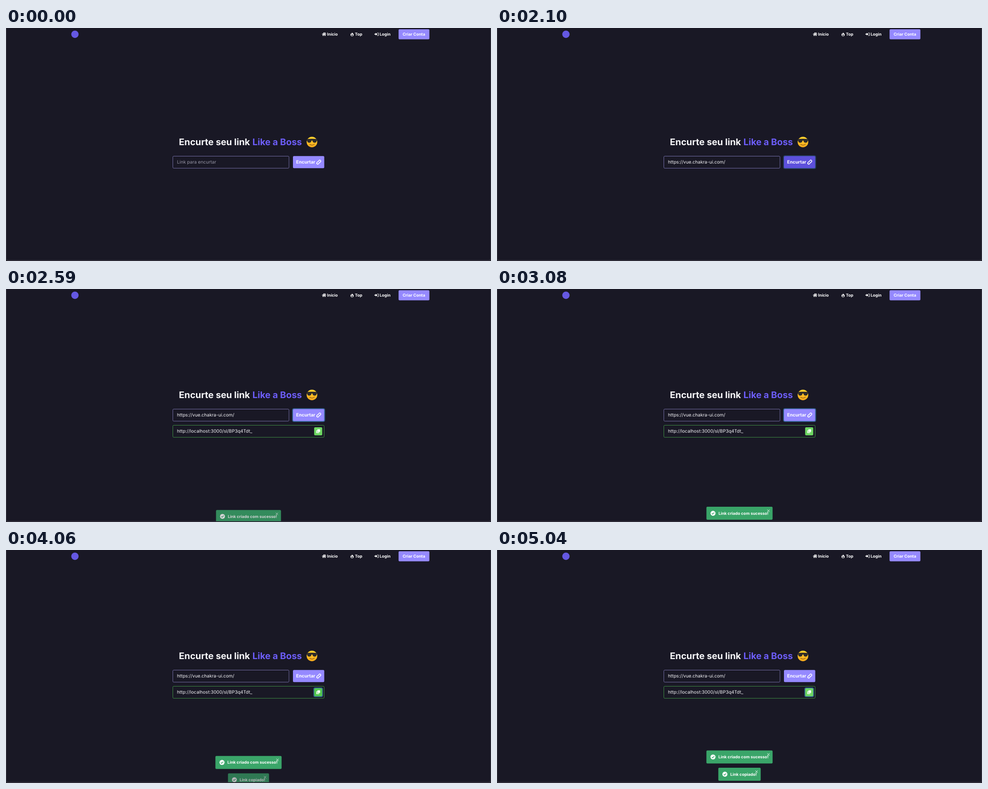
An HTML page that plays this animation: 1080 px wide and 519 px high, repeating every 5.18 s.

```html
<!DOCTYPE html>
<html lang="pt-BR">
<head>
<meta charset="utf-8">
<title>Encurtador de links</title>
<style>
  html, body { margin: 0; width: 100%; height: 100%; overflow: hidden; background: #191825; }
  svg { display: block; width: 100vw; height: 100vh; }
  text { font: 10.125px Inter, sans-serif; fill: #f6f6f9; text-rendering: geometricPrecision; white-space: pre; }
  .small { font-weight: 700; font-size: 9px; fill: #fff; }
  .title { font-weight: 700; font-size: 20.25px; }
  .label { font-weight: 700; fill: #fff; }
  .icon { fill: #fff; }
  .line { fill: none; stroke: #fff; }
  .ring { fill: none; stroke: #4299e1; stroke-opacity: .6; stroke-width: 1.7; }
</style>
</head>
<body>
<svg viewBox="0 0 1080 519">
  <defs>
    <linearGradient id="face" x2="0" y2="1">
      <stop offset="0" stop-color="#ffd42e"/>
      <stop offset="1" stop-color="#f9a91c"/>
    </linearGradient>
    <g id="check">
      <circle r="5.6" fill="#fff"/>
      <path d="M-2.6 .2 L-.8 2 L2.8 -1.7" fill="none" stroke="#3aa569" stroke-width="1.4"/>
    </g>
    <path id="cross" d="M-2.7 -2.7 L2.7 2.7 M2.7 -2.7 L-2.7 2.7" fill="none" stroke="#fff" stroke-width=".9"/>
  </defs>

  <rect width="1080" height="519" fill="#191825"/>

  <!-- navigation -->
  <circle cx="153.5" cy="14" r="8.2" fill="#6558e2"/>
  <g transform="translate(703.5 9.6)">
    <path class="line" d="M.5 4.3 L4.8 .8 L9.1 4.3" stroke-width="1.1" stroke-linecap="round"/>
    <path class="icon" d="M7 .4 H8.2 V3 H7Z M1.6 4.9 L4.8 2.3 L8 4.9 V8 H5.7 V5.7 H3.9 V8 H1.6Z"/>
  </g>
  <text class="small" x="715" y="17.2">Início</text>
  <path class="icon" transform="translate(767.2 9.3)" fill-rule="evenodd"
    d="M3.2 0 C3.4 2 6.9 2.8 6.9 5.6 A3.4 3.4 0 0 1 .1 5.6 C.1 4 1 3 1.7 2.4 C1.8 3.2 2 3.6 2.5 3.9 C3 2.6 3.4 1.6 3.2 0Z
       M3.6 4.3 C3 5.2 1.9 5.8 1.9 6.6 A1.6 1.5 0 0 0 5.2 6.6 C5.2 5.9 4.9 5.5 4.6 5.1 L4 5.7Z"/>
  <text class="small" x="777" y="17.2">Top</text>
  <g transform="translate(820.7 9.8)">
    <path class="icon" d="M0 2.8 H2.8 V.8 L6.4 4 L2.8 7.2 V5.2 H0Z"/>
    <path class="line" d="M6.2 .9 H7.6 Q8.5 .9 8.5 1.9 V6.1 Q8.5 7.1 7.6 7.1 H6.2" stroke-width="1.1"/>
  </g>
  <text class="small" x="832" y="17.2">Login</text>
  <rect x="874.2" y="2.8" width="68.6" height="22.5" rx="2.25" fill="#9589ff"/>
  <text class="small" x="883.2" y="17.2">Criar Conta</text>

  <!-- main form -->
  <g id="form">
    <text class="title" x="385" y="261.3">Encurte seu link</text>
    <text class="title" x="548.7" y="261.3" style="fill:#6c5df8">Like a Boss</text>
    <g transform="translate(681.3 254)">
      <circle r="11.8" fill="url(#face)"/>
      <path d="M-12 -6.6 Q0 -8 12 -6.6 L11.8 -3.6 L10.7 -3 Q10.2 1.6 5.8 1.6 Q1.8 1.6 1 -3.2 H-1 Q-1.8 1.6 -5.8 1.6 Q-10.2 1.6 -10.7 -3 L-11.8 -3.6Z" fill="#2d2b2a"/>
      <path d="M-5 5 Q.6 9.2 5.6 4.4" fill="none" stroke="#8a5a16" stroke-width="1.2" stroke-linecap="round"/>
    </g>
    <rect id="field" x="371.5" y="285.5" width="258.6" height="26.8" rx="2" fill="none"/>
    <text id="value" x="380.8" y="302.4"></text>
    <rect id="caret" y="293" width=".8" height="11.5" fill="#fff"/>
    <rect id="send" x="639" y="285.3" width="69.7" height="27" rx="2.25"/>
    <rect id="sendRing" class="ring" x="638.2" y="284.5" width="71.4" height="28.6" rx="3"/>
    <text class="label" x="646" y="302.4">Encurtar</text>
    <g class="line" transform="translate(696.4 298.8) rotate(-45)" stroke-width="1.6">
      <path d="M1.4 -.9 A2.2 2.2 0 0 0 -.6 -2.2 H-3.2 A2.2 2.2 0 0 0 -3.2 2.2 H-1.6"/>
      <path d="M-1.4 .9 A2.2 2.2 0 0 0 .6 2.2 H3.2 A2.2 2.2 0 0 0 3.2 -2.2 H1.6"/>
    </g>
  </g>

  <!-- shortened link -->
  <g id="result">
    <rect x="371.5" y="303.5" width="337" height="26.8" rx="2" fill="none" stroke="#469f49" stroke-width=".9"/>
    <text x="380.8" y="320.4">http://localhost:3000/sl/BP3q4Tdt_</text>
    <rect id="copy" x="686.2" y="307.9" width="18" height="18" rx="2.25"/>
    <rect id="copyRing" class="ring" x="685.4" y="307.1" width="19.6" height="19.6" rx="3"/>
    <rect class="icon" x="693.4" y="312.6" width="6" height="6" rx=".8"/>
    <path class="icon" d="M692.6 314.6 V319.4 H697.4 V320.1 Q697.4 321 696.5 321 H691.8 Q691 321 691 320.1 V315.5 Q691 314.6 691.8 314.6Z"/>
  </g>

  <g id="created">
    <rect x="-73.7" y="-14.5" width="147.4" height="29" rx="2.25" fill="#3aa569"/>
    <use href="#check" x="-59"/>
    <text class="small" x="-46.9" y="3.2">Link criado com sucesso!</text>
    <use href="#cross" x="64.5" y="-5.6"/>
  </g>
  <g id="copied">
    <rect x="-47.2" y="-14.5" width="94.4" height="29" rx="2.25" fill="#3aa569"/>
    <use href="#check" x="-32.5"/>
    <text class="small" x="-20.4" y="3.2">Link copiado!</text>
    <use href="#cross" x="38" y="-5.6"/>
  </g>

  <!-- window edge -->
  <path d="M0 519 V510 Q.5 518 6 518 H1074 Q1079.5 518 1080 510 V519Z" fill="#24232d"/>
  <path d="M.5 0 V513 Q.5 517.5 5 517.5 H1075 Q1079.5 517.5 1079.5 513 V0" fill="none" stroke="#41404c" stroke-width=".9"/>
</svg>
<script>
  const LOOP = 5180, TICK = 70;
  const FOCUS = 800, PASTE = 1260, CARET_OFF = 1820, PRESS = 2010, DONE = 2240;
  const COPY_PRESS = 3640, COPIED = 3795;
  const TOAST_Y = 499.4, TOAST_STEP = 38.4;

  const el = Object.fromEntries([...document.querySelectorAll('svg > g[id], g [id]')].map(e => [e.id, e]));
  const set = (e, attrs) => { for (const k in attrs) e.setAttribute(k, attrs[k]); };

  const ease = x => { x = Math.min(1, Math.max(0, x)); return 1 - (1 - x) ** 2; };
  const rgb = hex => [1, 3, 5].map(i => parseInt(hex.slice(i, i + 2), 16));

  // Blends from one value to the next; each key is [time, duration, value].
  function track(t, first, ...keys) {
    return keys.reduce((v, [at, dur, next]) => {
      const p = ease((t - at) / dur);
      return v.map((a, i) => a + (next[i] - a) * p);
    }, first);
  }
  const level = (t, first, ...keys) => track(t, [first], ...keys.map(([a, d, v]) => [a, d, [v]]))[0];
  const color = (t, first, ...keys) =>
    `rgb(${track(t, rgb(first), ...keys.map(([a, d, v]) => [a, d, rgb(v)])).map(Math.round)})`;

  // Critically damped spring from 0 to 1.
  function spring(ms) {
    const x = Math.max(0, ms) * 0.0089;
    return 1 - (1 + x) * Math.exp(-x);
  }

  function toast(e, p, pushed) {
    const y = TOAST_Y + TOAST_STEP * (1 - p - pushed);
    set(e, { transform: `translate(540 ${y}) scale(${0.9 + 0.1 * p})`, opacity: p });
  }

  function draw(t) {
    const pasted = t >= PASTE, done = t >= DONE;
    set(el.form, { transform: `translate(0 ${done ? -18 : 0})` });
    set(el.result, { visibility: done ? 'visible' : 'hidden' });

    set(el.field, {
      stroke: color(t, '#7f79b6', [FOCUS, 200, '#6c5df0'], [PRESS - 10, 130, '#7f79b6']),
      'stroke-width': level(t, 0.9, [FOCUS, 200, 1.4], [PRESS - 10, 130, 0.9])
    });
    el.value.textContent = pasted ? 'https://vue.chakra-ui.com/' : 'Link para encurtar';
    el.value.style.fill = pasted ? '#f6f6f9' : '#9796a6';
    set(el.caret, {
      x: pasted ? 508 : 380.8,
      visibility: t >= FOCUS && t < CARET_OFF ? 'visible' : 'hidden'
    });

    set(el.send, { fill: color(t, '#9589ff', [1450, 250, '#6c5dfa'], [PRESS, 250, '#5347c8'], [DONE, 250, '#9589ff']) });
    set(el.sendRing, { opacity: level(t, 0, [PRESS, 250, 1], [COPY_PRESS, 200, 0]) });
    set(el.copy, {
      fill: color(t, '#6dd662', [3140, 250, '#3abb3d'], [COPY_PRESS, 200, '#30a835'], [3780, 150, '#38b83c'], [3990, 250, '#6dd662'])
    });
    set(el.copyRing, { opacity: level(t, 0, [COPY_PRESS, 250, 1]) });

    const second = spring(t - COPIED);
    toast(el.created, spring(t - DONE), second);
    toast(el.copied, second, 0);
  }

  function frame() {
    draw(Math.floor(performance.now() % LOOP / TICK) * TICK);
    requestAnimationFrame(frame);
  }
  frame();
</script>
</body>
</html>
```
